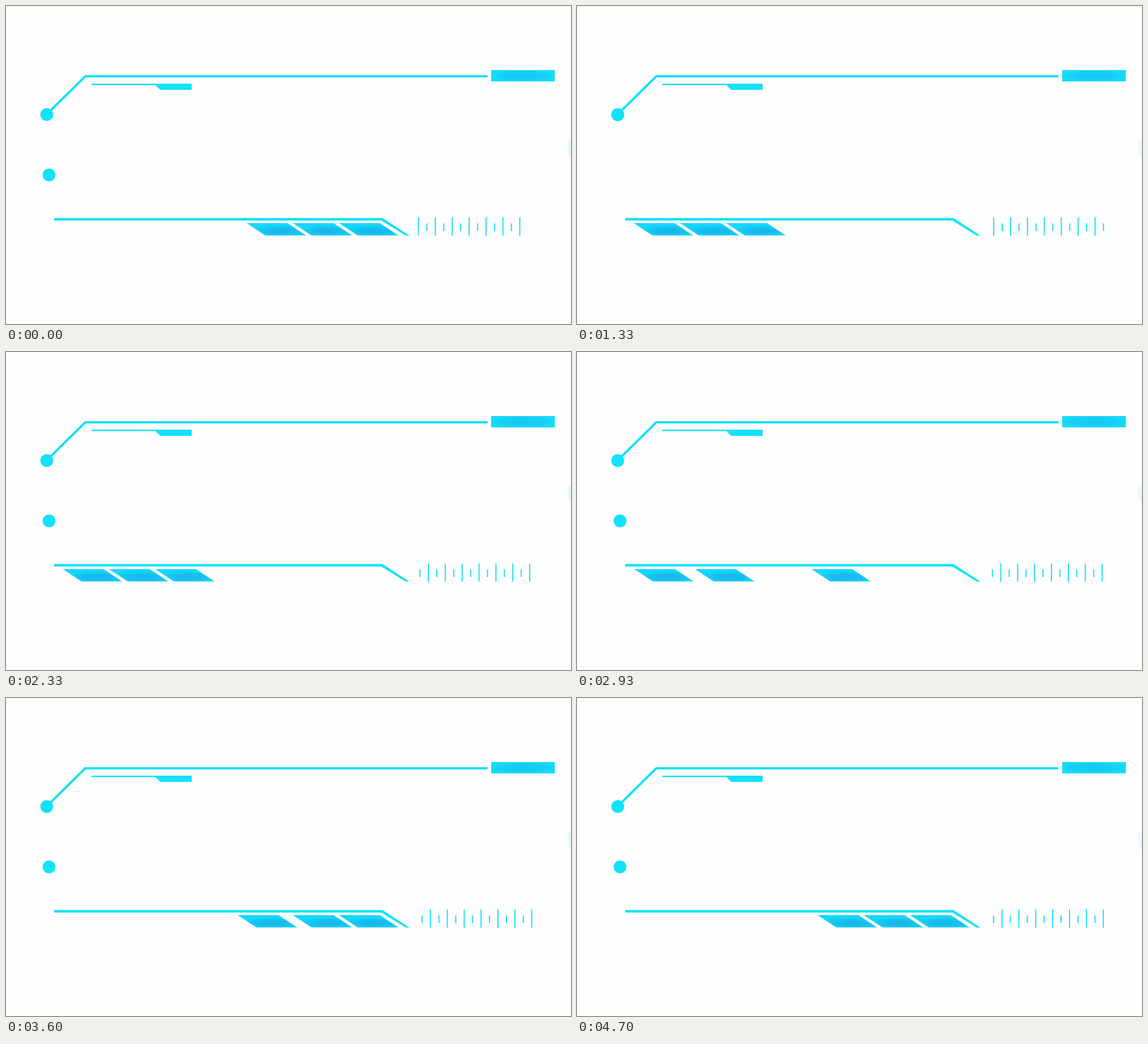
An HTML page for the animation above (4.73 s loop, 998 by 561 pixels).

```html
<!DOCTYPE html>
<html>
<head>
<meta charset="utf-8">
<style>
  html, body { margin: 0; width: 100%; height: 100%; overflow: hidden; background: #fefefe; }
  svg { display: block; width: 998px; height: 561px; }
</style>
</head>
<body>
<svg viewBox="0 0 998 561" fill="#14e1fa">
  <defs>
    <radialGradient id="blockFill" cx=".58" cy=".65" r=".5">
      <stop offset="0" stop-color="#17b6e8"/>
      <stop offset=".5" stop-color="#17bfee"/>
      <stop offset="1" stop-color="#14d8fa"/>
    </radialGradient>
    <radialGradient id="tagFill">
      <stop offset="0" stop-color="#17c8f0"/>
      <stop offset=".7" stop-color="#17cef3"/>
      <stop offset="1" stop-color="#14dcf9"/>
    </radialGradient>
    <clipPath id="rulerClip"><rect x="726" y="370" width="210" height="38"/></clipPath>
  </defs>
  <path d="M998 237Q992 236 992 242Q992 262 998 270Z" fill="#e6f7fe"/>
  <path d="M76 187L140 124H850.5" fill="none" stroke="#14e1fa" stroke-width="4"/>
  <circle cx="72" cy="191.5" r="11.3"/>
  <path d="M150.500 137H326.500Q328 137 328 138.500V146.500Q328 148 326.500 148H272.500L264 139.500H150.500Z"/>
  <rect x="857" y="113" width="112.500" height="20" fill="url(#tagFill)"/>
  <path d="M85 374H665L712.500 405H706L663 378.500H85Z"/>
  <circle id="dot" cx="76" cy="298" r="11.3"/>
  <g id="blocks" fill="url(#blockFill)"></g>
  <g clip-path="url(#rulerClip)"><g id="ruler"></g></g>
</svg>
<script>
const LOOP = 4730;
const $ = id => document.getElementById(id);
const clamp = x => Math.min(1, Math.max(0, x));

function add(parent, d) {
  const path = document.createElementNS('http://www.w3.org/2000/svg', 'path');
  path.setAttribute('d', d);
  return parent.appendChild(path);
}

const shift = (el, x, y = 0) => el.setAttribute('transform', `translate(${x} ${y})`);

// Symmetric cubic-bezier(.67, 0, .33, 1)
function ease(x) {
  x = clamp(x);
  let lo = 0, hi = 1;
  for (let i = 0; i < 24; i++) {
    const u = (lo + hi) / 2;
    const bx = 2.01 * u * (1 - u) ** 2 + 0.99 * u * u * (1 - u) + u ** 3;
    if (bx < x) lo = u; else hi = u;
  }
  return lo * lo * (3 - 2 * lo);
}

const blocks = [0, 1, 2].map(() => add($('blocks'), 'M0 383H72L105 404.7H33Z'));

for (let i = 0; i < 18; i++) {
  const x = 906.5 - 14.917 * i;
  add($('ruler'), i % 2 ? `M${x} 383.5h2v13.500h-2z` : `M${x} 373h2v32h-2z`);
}

// [time, distance left to travel], falling exponentially between points
const drift = [[0, 52.3], [600, 27.2], [1330, 14.9], [2330, 4.9], [2930, 2.4], [3600, 1.3], [LOOP, 0.3]];

function rulerOffset(t) {
  const k = drift.findIndex(([end], i) => i && t <= end);
  const [t0, a] = drift[k - 1], [t1, b] = drift[k];
  return drift[0][1] - a * (b / a) ** ((t - t0) / (t1 - t0));
}

// The lower dot hops onto the upper one and back
const hop = (t, middle) => ease(1 - Math.abs(t - middle) / 270);

function draw(now) {
  const t = now % LOOP;
  blocks.forEach((block, i) => {
    const left = ease((t - 5 - 200 * i) / 920);
    const right = ease((t - 2482 - 200 * (2 - i)) / 920);
    shift(block, 425 + 81.6 * i - 324.7 * (left - right));
  });
  const h = hop(t, 1350) + hop(t, 4050);
  shift($('dot'), -4 * h, -106.5 * h);
  shift($('ruler'), rulerOffset(t));
}

const start = performance.now();
function tick() {
  draw(performance.now() - start);
  requestAnimationFrame(tick);
}
tick();
</script>
</body>
</html>
```
